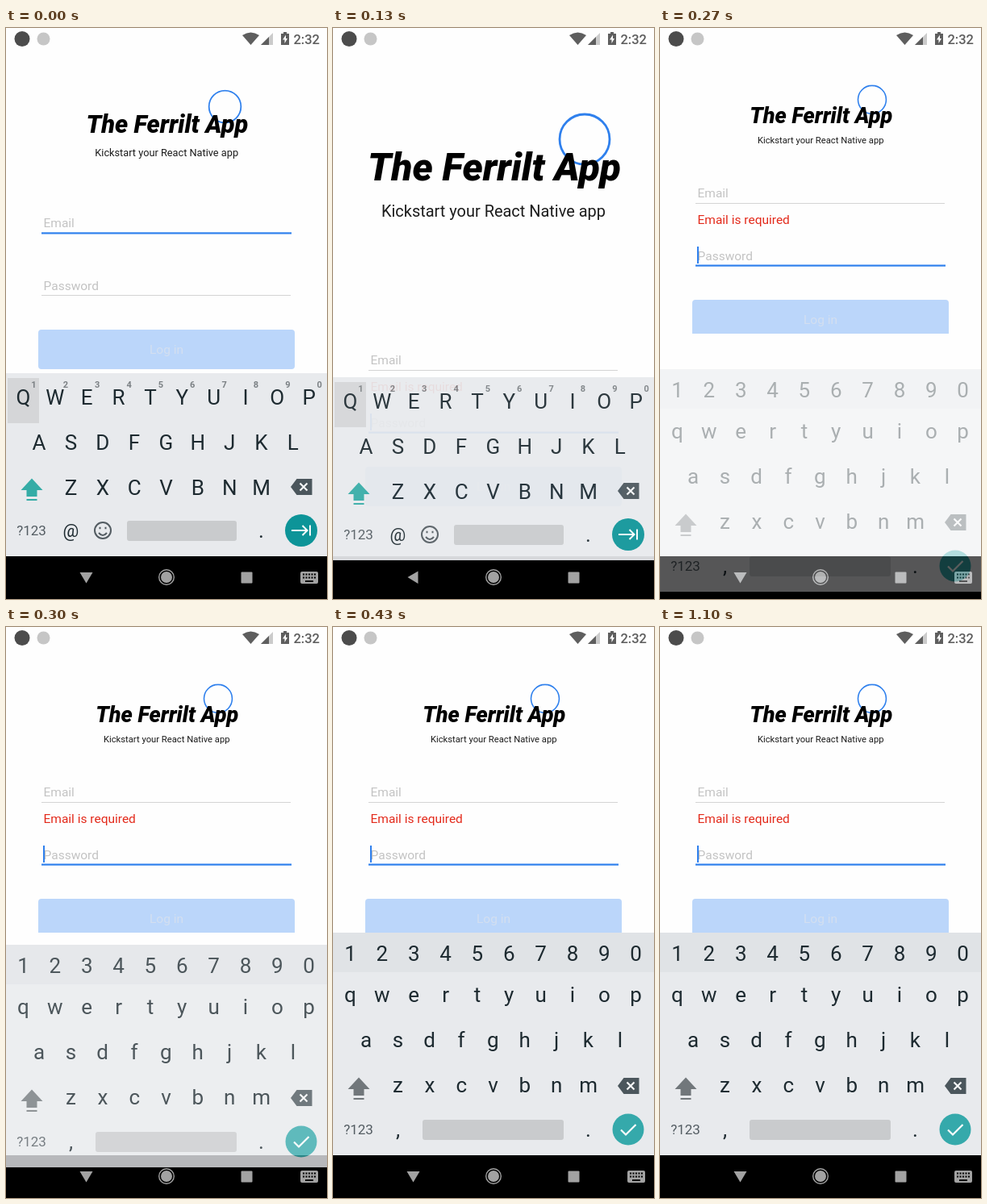
These frames come from a looping animation (398 px wide and 708 px high, 1.6 s). An HTML page:

```html
<!DOCTYPE html>
<html lang="en">
<head>
<meta charset="utf-8">
<title>Login form</title>
<style>
  html, body { margin: 0; width: 100%; height: 100%; overflow: hidden; background: #fefefe; }
  svg { display: block; width: 100vw; height: 100vh; font-family: Roboto, Arial, sans-serif; }
  svg g, svg rect, svg text { animation: 1600ms step-end infinite; }

  #brand { animation-name: brand; }
  #title { font-size: 50px; font-weight: 900; font-style: italic; font-stretch: 75%; }
  #tagline { font-size: 24px; font-weight: 400; font-stretch: 75%; fill: #1c1c1c; }
  #form { animation-name: form; font-size: 15.5px; }
  .hint { fill: #c3c3c3; }
  #error { fill: #e3291a; animation-name: later; }
  #passwordFocus { animation-name: later; }
  #emailFocus { animation-name: first; }
  #caret { animation-name: caret; }
  #cut { animation-name: cut; }
  #upper { animation-name: upper; }
  #lower { animation-name: lower; }
  #navOpen { animation-name: navOpen; }
  #navBack { animation-name: navBack; }
  .keys { font-size: 26px; fill: #1d2a30; text-anchor: middle; }
  .small { font-size: 11px; font-weight: 700; fill: #7b8084; }
  .mode { font-size: 17px; fill: #535c62; }

  @keyframes brand {
    0% { transform: translate(71.82px, 9.2px) scale(.64); }
    4.375% { transform: none; }
    16.875%, 100% { transform: translate(87px, 11px) scale(.564); }
  }
  @keyframes form {
    0% { transform: translateY(-170px); }
    4.375% { transform: none; }
    16.875%, 100% { transform: translateY(-207px); }
  }
  @keyframes later { 0% { opacity: 0; } 4.375%, 100% { opacity: 1; } }
  @keyframes first { 0% { opacity: 1; } 4.375%, 100% { opacity: 0; } }
  @keyframes cut { 0% { opacity: 0; } 16.875%, 100% { opacity: 1; } }
  @keyframes caret {
    0% { opacity: 0; }
    4.375% { opacity: 1; }
    37.5% { opacity: 0; }
    68.75%, 100% { opacity: 1; }
  }
  /* Keyboards slide up to 70px and fade in proportion, on a fifth-power curve. */
  @keyframes upper {
    0% { transform: none; opacity: 1; }
    6.25% { transform: translateY(1px); opacity: .985; }
    8.125% { transform: translateY(5px); opacity: .93; }
    10.625% { transform: translateY(19px); opacity: .73; }
    12.5% { transform: translateY(44px); opacity: .37; }
    14.375%, 100% { transform: translateY(70px); opacity: 0; }
  }
  @keyframes lower {
    0% { transform: translateY(70px); opacity: 0; }
    16.875% { transform: translateY(44px); opacity: .37; }
    18.75% { transform: translateY(15px); opacity: .79; }
    20.625% { transform: translateY(5px); opacity: .93; }
    23.125% { transform: translateY(1px); opacity: .985; }
    25%, 100% { transform: none; opacity: 1; }
  }
  @keyframes navOpen { 0% { opacity: 1; } 4.375% { opacity: 0; } 14.375%, 100% { opacity: 1; } }
  @keyframes navBack { 0% { opacity: 0; } 4.375% { opacity: 1; } 14.375%, 100% { opacity: 0; } }
</style>
</head>
<body>
<svg viewBox="0 0 398 708" preserveAspectRatio="none">
  <defs>
    <g id="shift">
      <path d="M32 558.500L45.500 573H38.500V581H25.500V573H18.500Z"/>
      <rect x="25.500" y="584" width="13" height="2"/>
    </g>
    <g id="erase">
      <path d="M360.500 559H379.500V579H360.500L353 569Z" fill="#4b565c"/>
      <path d="M364.500 564.500L373.500 573.500M373.500 564.500L364.500 573.500" stroke="#f4f5f6" stroke-width="2.200"/>
    </g>
  </defs>
  <rect width="398" height="708" fill="#fefefe"/>

  <!-- Status bar -->
  <circle cx="20" cy="13.500" r="9.500" fill="#4c4c4c"/>
  <circle cx="46.500" cy="13.500" r="8" fill="#c6c6c6"/>
  <g fill="#5e5e5e">
    <path d="M293 9Q303.500 2 314 9L303.500 21Z"/>
    <path d="M331 6V21H316Z" fill="#cbcbcb"/>
    <path d="M326 11V21H316Z"/>
    <path d="M344 5H348V7H351V21H341V7H344Z"/>
    <path d="M347 8.500L343 14.500H345.500V19L349 13H347Z" fill="#fefefe"/>
    <text x="389" y="19.500" font-size="16.500" font-weight="500" text-anchor="end">2:32</text>
  </g>

  <g id="brand" text-anchor="middle">
    <circle cx="312" cy="138" r="31" fill="none" stroke="#2f80ed" stroke-width="2.800"/>
    <text id="title" x="200" y="189" data-span="314">The Ferrilt App</text>
    <text id="tagline" x="199" y="234" data-span="278">Kickstart your React Native app</text>
  </g>

  <g id="form">
    <text class="hint" x="46.500" y="417">Email</text>
    <rect x="44" y="424" width="309" height="1" fill="#d4d4d4"/>
    <rect id="emailFocus" x="44" y="423.300" width="310" height="2.200" fill="#2f80ed"/>
    <text id="error" x="46.500" y="450">Email is required</text>
    <text class="hint" x="46.500" y="494.500">Password</text>
    <rect x="44" y="501" width="309" height="1" fill="#d4d4d4"/>
    <rect id="passwordFocus" x="44" y="500.500" width="310" height="2.200" fill="#2f80ed"/>
    <rect id="caret" x="46" y="478" width="2" height="21" fill="#2f80ed"/>
    <rect x="40" y="544" width="318" height="49" rx="4" fill="#bbd6fa"/>
    <text x="199" y="574" text-anchor="middle" fill="#d3dff0">Log in</text>
  </g>
  <rect id="cut" y="379" width="398" height="276" fill="#fefefe"/>

  <!-- Navigation bar -->
  <rect y="655" width="398" height="53"/>
  <g fill="#a2a2a2">
    <circle cx="199" cy="681" r="9.300" fill="none" stroke="#a2a2a2" stroke-width="1.400"/>
    <circle cx="199" cy="681" r="7"/>
    <rect x="291.500" y="674.500" width="14" height="14" rx="1"/>
    <g id="navBack"><path d="M105.500 673.500V689L92.500 681Z"/></g>
    <g id="navOpen">
      <path d="M91.500 675H107.500L99.500 688.500Z"/>
      <rect x="365" y="674" width="22" height="15" rx="2"/>
      <path d="M368 677.500H384M368 681.500H384" stroke="#000" stroke-width="2" stroke-dasharray="2 1.500"/>
      <path d="M371 686H381" stroke="#000" stroke-width="2"/>
    </g>
  </g>

  <!-- Keyboards -->
  <g id="upper" class="keys">
    <rect y="428" width="398" height="227" fill="#e8eaed"/>
    <rect x="2" y="434" width="39" height="56" fill="#d5d6d8"/>
    <use href="#shift" fill="#35aca6"/>
    <use href="#erase"/>
    <text class="mode" x="31.500" y="629">?123</text>
    <text x="80.500" y="631" font-size="22">@</text>
    <g fill="none" stroke="#535c62" stroke-width="2">
      <circle cx="120" cy="623" r="10"/>
      <path d="M115 626Q120 632 125 626"/>
      <path d="M115.500 620H117.500M122.500 620H124.500" stroke-width="2.500"/>
    </g>
    <rect x="150" y="611" width="136" height="25" rx="3" fill="#c9cbcd"/>
    <text x="316.500" y="632">.</text>
    <circle cx="366" cy="623" r="20" fill="#0d9498"/>
    <path d="M354 623H373M367.500 617L373.500 623L367.500 629M377 616.500V629.500" fill="none" stroke="#fafcfc" stroke-width="2"/>
  </g>
  <g id="lower" class="keys">
    <rect y="379" width="398" height="276" fill="#e8eaed"/>
    <rect y="379" width="398" height="49" fill="#e0e3e6"/>
    <use href="#shift" fill="#71777b"/>
    <use href="#erase"/>
    <text class="mode" x="31.500" y="629">?123</text>
    <text x="80.500" y="632">,</text>
    <rect x="111" y="611" width="175" height="25" rx="3" fill="#c9cbcd"/>
    <text x="316.500" y="632">.</text>
    <circle cx="366" cy="623" r="19.500" fill="#35a9ab"/>
    <path d="M357 623.500L363 629.500L375.500 617" fill="none" stroke="#fafcfc" stroke-width="2.200"/>
  </g>
</svg>
<script>
  const PITCH = 39.35;

  function addRow(id, chars, x, y, className = "") {
    const row = document.createElementNS("http://www.w3.org/2000/svg", "text");
    row.setAttribute("x", [...chars].map((_, i) => x + i * PITCH).join(" "));
    row.setAttribute("y", y);
    row.setAttribute("class", className);
    row.textContent = chars;
    document.getElementById(id).append(row);
  }

  addRow("upper", "1234567890", 34.5, 446, "small");
  addRow("upper", "QWERTYUIOP", 21.5, 467);
  addRow("upper", "ASDFGHJKL", 41, 523);
  addRow("upper", "ZXCVBNM", 80.5, 579);

  addRow("lower", "1234567890", 21.5, 414);
  addRow("lower", "qwertyuiop", 21.5, 465);
  addRow("lower", "asdfghjkl", 41, 521);
  addRow("lower", "zxcvbnm", 80.5, 577);

  // Choose the font size at which each line has its natural span.
  for (const line of document.querySelectorAll("[data-span]")) {
    const size = parseFloat(getComputedStyle(line).fontSize);
    line.style.fontSize = size * line.dataset.span / line.getComputedTextLength() + "px";
  }
</script>
</body>
</html>
```
